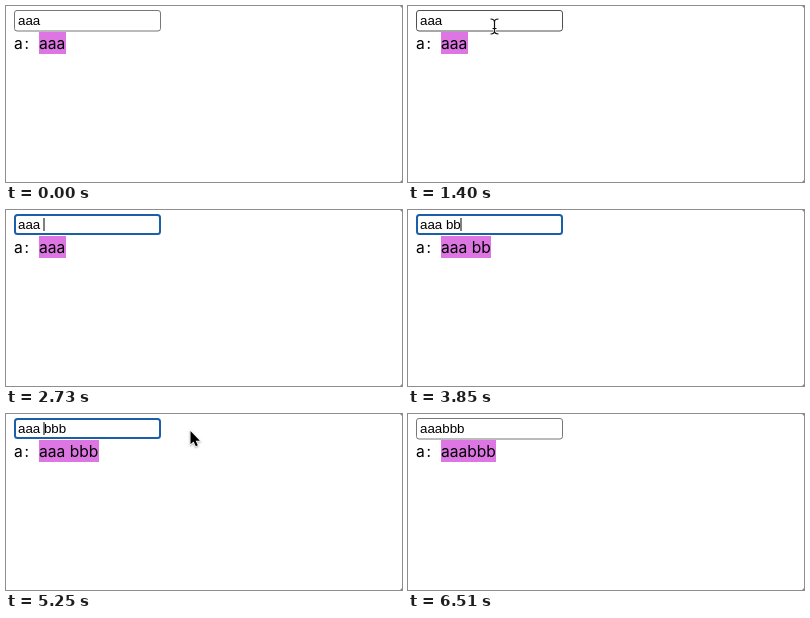
An HTML page with a canvas for the animation above (6930 ms loop, 396x176 px).

```html
<!DOCTYPE html>
<html lang="en">
<head>
<meta charset="utf-8">
<style>
  html, body { margin: 0; width: 100%; height: 100%; overflow: hidden; background: #fff; }
  canvas { display: block; }
</style>
</head>
<body>
<canvas id="stage" width="396" height="176"></canvas>
<script>
const ctx = document.getElementById('stage').getContext('2d');
const LOOP = 6930, TICK = 70, BLINK = 560;
const FOCUS = 1680, BLUR = 5600;
const INPUT_FONT = '13.333px "Liberation Sans", Arial, sans-serif';
const LABEL_FONT = '15.6px Inter, Roboto, sans-serif';

const keys = [
  { at: 2730, key: ' ' },
  { at: 3570, key: 'b' }, { at: 3850, key: 'b' }, { at: 4060, key: 'b' },
  ...[0, 1, 2].map(i => ({ at: 5110 + i * TICK, key: 'Left' })),
  { at: 5530, key: 'Backspace' },
];
const clicks = [{ from: 910, to: 1050 }, { from: 1610, to: 1820 }, { from: BLUR, to: 5810 }];

const easeOut = k => 1 - (1 - k) ** 2;
const linear = k => k;
const moves = [
  { from: 280, to: 840, end: [66.5, 50], ease: easeOut },
  { from: 1190, to: 1400, end: [86.5, 20], ease: linear },
  { from: 1400, to: 1540, end: [88.5, 19.5], ease: linear },
  { from: 4340, to: 4690, end: [187, 17], ease: easeOut },
  { from: 4970, to: 5110, end: [184.5, 17], ease: linear },
  { from: 6020, to: 6160, end: [208, 126], ease: linear },
  { from: 6300, to: 6510, end: [202, 178], ease: linear },
];

const during = (t, { from, to }) => t >= from && t < to;

// Replays the keystrokes up to time t.
function editorAt(t) {
  let value = 'aaa', caret = 3, lastKey = FOCUS;
  for (const { at, key } of keys) {
    if (at > t) break;
    lastKey = at;
    if (key === 'Left') {
      caret--;
    } else if (key === 'Backspace') {
      value = value.slice(0, caret - 1) + value.slice(caret--);
    } else {
      value = value.slice(0, caret) + key + value.slice(caret++);
    }
  }
  const focused = t >= FOCUS && t < BLUR;
  const caretOn = focused && Math.floor((t - lastKey) / BLINK) % 2 === 0;
  return { value, caret, focused, caretOn };
}

function pointerAt(t) {
  let x = 126, y = 125;
  for (const { from, to, end, ease } of moves) {
    const k = ease(Math.min(1, Math.max(0, (t - from) / (to - from))));
    x += (end[0] - x) * k;
    y += (end[1] - y) * k;
  }
  // Typing hides the pointer until it moves or clicks again.
  const last = times => Math.max(-1, ...times.filter(time => time <= t));
  const woken = last([...moves, ...clicks].map(event => event.from));
  const typed = last(keys.filter(({ key }) => key !== 'Left').map(({ at }) => at));
  return { x, y, shown: woken > typed, overInput: x > 8 && x < 155 && y > 4 && y < 25 };
}

function text(string, x, y, font) {
  ctx.font = font;
  ctx.fillStyle = '#000';
  ctx.fillText(string, x, y);
}

function strokeBox(x, y, w, h, color, line) {
  ctx.beginPath();
  ctx.roundRect(x + line / 2, y + line / 2, w - line, h - line, 2.5);
  ctx.strokeStyle = color;
  ctx.lineWidth = line;
  ctx.stroke();
}

function drawArrow() {
  const shape = new Path2D('M0 0V13.2L3.1 10.6L5.3 15.2L7.3 14.3L5.2 9.8H9.4Z');
  ctx.shadowColor = 'rgba(0,0,0,.35)';
  ctx.shadowBlur = 2;
  ctx.shadowOffsetY = 1;
  ctx.strokeStyle = '#fff';
  ctx.lineWidth = 1.4;
  ctx.stroke(shape);
  ctx.shadowColor = 'transparent';
  ctx.fillStyle = '#000';
  ctx.fill(shape);
}

function drawBeam() {
  const shape = new Path2D('M-4 -7Q0 -7 0 -4Q0 -7 4 -7M0 -4V5M-2 2.5H2M-4 8Q0 8 0 5Q0 8 4 8');
  for (const [color, width] of [['#fff', 2.6], ['#111', 1.2]]) {
    ctx.strokeStyle = color;
    ctx.lineWidth = width;
    ctx.stroke(shape);
  }
}

function drawPointer(t, { x, y, shown, overInput }) {
  ctx.save();
  ctx.translate(x, y);
  if (shown) (overInput ? drawBeam : drawArrow)();
  ctx.restore();

  if (clicks.some(click => during(t, click))) {
    ctx.beginPath();
    ctx.arc(x - 1, y - .5, overInput ? 17 : 21.5, 0, Math.PI * 2);
    ctx.strokeStyle = '#000';
    ctx.lineWidth = 1.4;
    ctx.stroke();
  }
}

function drawInput({ value, caret, focused, caretOn }, hovered) {
  if (focused) strokeBox(8, 4, 147, 21, '#1b5fa8', 2);
  else strokeBox(8, 4, 147, 21.5, hovered ? '#505050' : '#777', 1);
  text(value, 12, 19, INPUT_FONT);
  if (caretOn) {
    const x = 12 + ctx.measureText(value.slice(0, caret)).width;
    ctx.fillRect(Math.round(x) - .5, 8, 1, 13);
  }
}

function drawLabel(value) {
  text('a', 8, 43, LABEL_FONT);
  text(':', 18.5, 43, LABEL_FONT);
  ctx.fillStyle = '#dd75e3';
  ctx.fillRect(33, 26, Math.ceil(ctx.measureText(value).width), 22);
  text(value, 33, 43, LABEL_FONT);
}

function drawCorners() {
  ctx.fillStyle = '#888';
  for (const [y, tip] of [[0, 2], [176, 174]]) {
    ctx.beginPath();
    ctx.moveTo(394, y);
    ctx.lineTo(396, y);
    ctx.lineTo(396, tip);
    ctx.fill();
  }
}

function draw(t) {
  const editor = editorAt(t), pointer = pointerAt(t);
  ctx.fillStyle = '#fff';
  ctx.fillRect(0, 0, 396, 176);
  drawCorners();
  drawInput(editor, pointer.overInput);
  drawLabel(editor.value.trimEnd());
  drawPointer(t, pointer);
}

function frame() {
  const t = performance.now() % LOOP;
  draw(Math.floor(t / TICK) * TICK);
  requestAnimationFrame(frame);
}
frame();
</script>
</body>
</html>
```
